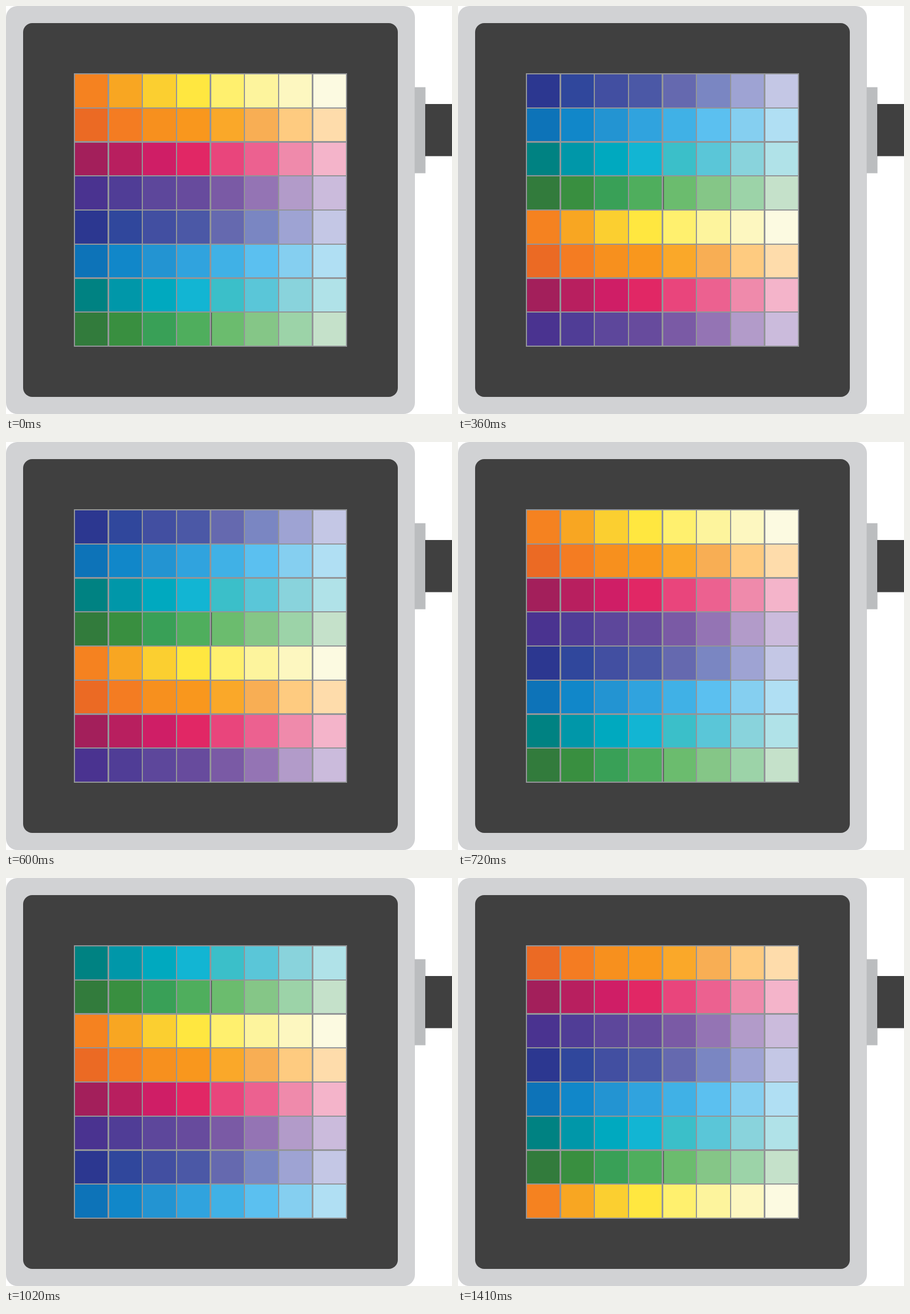
Animation of 782 by 716 pixels, one loop 1440 ms. Source, as an HTML page with a canvas:

```html
<!DOCTYPE html>
<html lang="en">
<head>
<meta charset="utf-8">
<title>LED matrix</title>
<style>
  html, body { margin: 0; height: 100%; overflow: hidden; background: #fff; }
  canvas { display: block; }
</style>
</head>
<body>
<canvas id="stage" width="782" height="716"></canvas>
<script>
const ctx = document.getElementById('stage').getContext('2d');
const SIZE = 8, STEP = 30;
const DARK = '#404040', GRID = '#939598';

const rows = [
  'f58220 f8a622 fbcf30 ffe740 fff06e fdf49d fdf7c0 fcfae1',
  'eb6a24 f47c22 f7901e f9971d faa829 f8ae54 fecb80 fedcab',
  'a31f5b b81f5f cf1e66 e12765 e9457c ec6190 ef8aab f4b4ca',
  '4a3390 503d96 5d479b 674b9d 7a5aa5 9474b4 b29bc9 cbbbdc',
  '2c3790 30479c 424fa1 4b58a6 6569af 7a86c2 9ea3d3 c4c7e5',
  '0d73b8 1187c9 2394d2 30a3de 40b1e6 5bc0f0 85cff0 b0dff3',
  '008282 0097a9 00a9bf 12b5d3 3bbfc9 5ac6d8 89d3dc b0e2e8',
  '327b3c 398f40 39a057 4fae5d 6bbc6e 85c687 9cd3a8 c5e1ca'
].map(row => row.split(' ').map(hex => '#' + hex));

const lineX = i => 120 + i * 59.625;
const lineY = i => 119 + i * 59.75;
const lineStart = center => Math.round(center - 1.2);
const lineEnd = center => Math.round(center + 1.2);

function rect(color, left, top, right, bottom, radius = 0) {
  ctx.fillStyle = color;
  ctx.beginPath();
  ctx.roundRect(left, top, right - left, bottom - top, radius);
  ctx.fill();
}

function drawCase() {
  rect('#fff', 0, 0, 782, 716);
  rect('#d1d2d4', 0, 0, 717, 716, 20);
  rect(DARK, 30, 30, 687, 686, 16);
  rect('#bbbdbf', 716.5, 142.5, 735.5, 293.5);
  rect(DARK, 735, 172, 782, 263.5);
  rect(GRID, 119, 118, 598, 598);
}

function draw(now) {
  const shift = Math.floor(now / STEP) % SIZE;
  drawCase();
  rows.forEach((colors, index) => {
    const y = (index + shift) % SIZE;
    const top = lineEnd(lineY(y)), bottom = lineStart(lineY(y + 1));
    colors.forEach((color, x) =>
      rect(color, lineEnd(lineX(x)), top, lineStart(lineX(x + 1)), bottom));
    // The green row has a thin dark gap in the middle.
    if (index === SIZE - 1) rect(DARK, 360, top, 361, bottom);
  });
}

let start;
function tick(now) {
  start ??= now;
  draw(now - start);
  requestAnimationFrame(tick);
}
draw(0);
requestAnimationFrame(tick);
</script>
</body>
</html>
```
